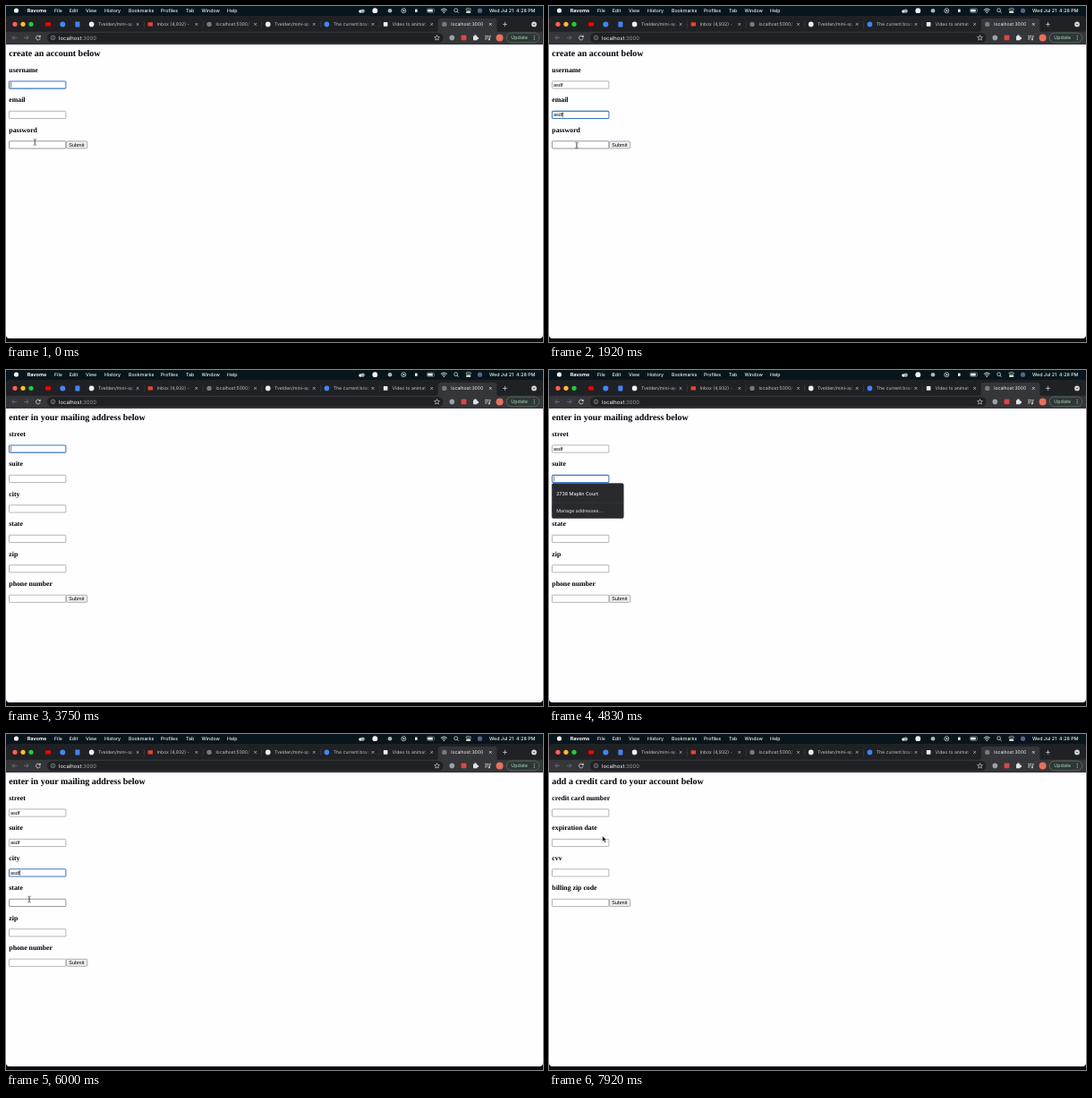
An HTML page for the animation above (8 s loop, 600 px wide and 375 px high).

```html
<!DOCTYPE html>
<html lang="en">
<head>
<meta charset="utf-8">
<title>Account form</title>
<style>
  html, body { margin: 0; width: 100%; height: 100%; overflow: hidden; background: #07090b; }
  svg { display: block; width: 100%; height: 100%; }
  text { white-space: pre; text-rendering: geometricPrecision; }
  .ui { font-family: Inter, "Open Sans", sans-serif; }
  .serif { font-family: "Liberation Serif", "Times New Roman", serif; font-weight: 700; }
  .form { font-family: "Liberation Sans", Arial, sans-serif; font-size: 5.55px; }
</style>
</head>
<body>
<svg viewBox="0 0 600 375" xmlns="http://www.w3.org/2000/svg">
  <defs>
    <linearGradient id="fade">
      <stop offset="0" stop-color="#202124" stop-opacity="0"/>
      <stop offset="1" stop-color="#202124"/>
    </linearGradient>
  </defs>
  <g id="frame"></g>
  <g id="page"></g>
</svg>
<script>
const LOOP = 8000;
const ROW = 33.45;

const text = (x, y, s, size, fill = '#fff', more = '') =>
  `<text x="${x}" y="${y}" font-size="${size}" fill="${fill}" ${more}>${s}</text>`;
const rect = (x, y, w, h, fill, r = 0, more = '') =>
  `<rect x="${x}" y="${y}" width="${w}" height="${h}" rx="${r}" fill="${fill}" ${more}/>`;
const dot = (x, y, r, fill, more = '') => `<circle cx="${x}" cy="${y}" r="${r}" fill="${fill}" ${more}/>`;
const line = (d, stroke, w = 0.7, more = '') =>
  `<path d="${d}" fill="none" stroke="${stroke}" stroke-width="${w}" ${more}/>`;

// ---- static browser window ----

function menuBar() {
  const items = [['File', 54], ['Edit', 70.7], ['View', 89], ['History', 110], ['Bookmarks', 137],
    ['Profiles', 173], ['Tab', 201], ['Window', 218.5], ['Help', 247]];
  const c = '#f0f2f3';
  return rect(0, 0, 600, 15, '#08151c')
    + dot(11.5, 5, 2.6, '#f2f2f2')
    + text(23.7, 7, 'Ravome', 5.5, '#fff', 'font-weight="700"')
    + items.map(([s, x]) => text(x, 7, s, 5.25, c, 'font-weight="500"')).join('')
    + dot(396, 6, 1.8, c) + dot(398.6, 5.6, 2.2, '#a9abad')
    + dot(412.3, 5.2, 2.9, '#f4f4f4')
    + dot(429, 5.2, 2.3, '#b5b7b9')
    + dot(444.3, 5.2, 2.5, 'none', `stroke="${c}" stroke-width=".7"`)
    + `<path d="M443.6 3.9 446 5.2 443.6 6.5Z" fill="${c}"/>`
    + rect(457, 3.6, 2.6, 3.2, c)
    + rect(470.4, 3, 8, 4.2, 'none', 1, 'stroke="#9fa1a3" stroke-width=".6"')
    + rect(471.2, 3.8, 5.6, 2.6, c, 0.4)
    + line('M485.8 4.4Q489.3 1.4 492.8 4.4M487.2 5.8Q489.3 4 491.4 5.8', c, 0.9)
    + dot(489.3, 7.2, 0.8, c)
    + dot(502.6, 4.7, 1.9, 'none', `stroke="${c}" stroke-width=".7"`) + line('M504 6.1 505.6 7.8', c)
    + rect(514, 2.7, 5.4, 2.1, 'none', 1, `stroke="${c}" stroke-width=".6"`)
    + rect(514, 5.7, 5.4, 2.1, c, 1)
    + dot(529.5, 5.2, 2.6, '#5b6484')
    + text(540, 7, 'Wed Jul 21  4:28 PM', 5.3, c, 'font-weight="500"');
}

function tabStrip() {
  const tabs = [
    ['Tvelden/mini-ap', 'hub'], ['Inbox (4,932) - ', 'mail'], ['localhost:5000/', 'globe'],
    ['Tvelden/mini-ap', 'hub'], ['The current bran', 'find'], ['Video to animat', 'clip'],
    ['localhost:3000', 'globe'],
  ];
  const icons = {
    hub: x => dot(x, 20.4, 2.8, '#f1f3f4'),
    mail: x => rect(x - 2.7, 18.2, 5.4, 4.4, '#ea4335', 0.5),
    globe: x => dot(x, 20.4, 2.7, '#777b80'),
    find: x => dot(x, 20.4, 2.8, '#4285f4'),
    clip: x => rect(x - 2.3, 18, 4.6, 4.8, '#eceded', 0.5),
  };
  let out = '<path d="M0 29V15Q0 11 4 11H596Q600 11 600 15V29Z" fill="#202124"/>'
    + dot(10, 20.3, 2.6, '#ff5f57') + dot(19, 20.3, 2.6, '#febc2e') + dot(28, 20.3, 2.6, '#28c840')
    + rect(44, 18.3, 6, 4.2, '#f00', 1)
    + dot(63.3, 20.4, 3, '#4285f4')
    + rect(77.4, 17.6, 5, 5.8, '#4285f4', 0.6)
    + '<path d="M480.5 29Q482.8 29 482.8 26.5V17Q482.8 14 485.8 14H545.4Q548.4 14 548.4 17V26.5Q548.4 29 550.7 29Z" fill="#35363a"/>';
  tabs.forEach(([title, icon], i) => {
    const x = 88.6 + i * 65.7, active = i === 6;
    out += icons[icon](x + 7) + text(x + 14.4, 22.3, title, 5.1, active ? '#f1f3f4' : '#c3c6ca');
    if (!active) out += rect(x + 56, 16, 9, 9, '#202124') + rect(x + 48, 16, 8.2, 9, 'url(#fade)');
    if (i < 5) out += line(`M${x + 65.7} 16.5V24.5`, '#4d4f53', 0.5);
    const c = x + 58.5;
    out += line(`M${c - 1.4} 19l2.8 2.8m0 -2.8l-2.8 2.8`, active ? '#fff' : '#d4d6da', 0.65);
  });
  return out
    + line('M555 20.4h5M557.5 17.9v5', '#dadce0', 0.7)
    + dot(590, 20.4, 2.9, '#d5d7da') + line('M588.8 19.9l1.2 1.2 1.2-1.2', '#202124', 0.7);
}

function toolbar() {
  const c = '#dfe1e5', dim = '#7b7e83';
  return rect(0, 28.7, 600, 14.3, '#35363a')
    + line('M12 35.4H7M9.3 33 6.9 35.4 9.3 37.8', dim)
    + line('M20 35.4h5M22.7 33 25.1 35.4 22.7 37.8', dim)
    + line('M37.8 34A2.4 2.4 0 1 0 38.2 36.2', c, 0.8) + `<path d="M38.6 32.6V35H36.2Z" fill="${c}"/>`
    + rect(46, 29.9, 442.5, 11.2, '#202124', 5.6)
    + dot(52.5, 35.4, 2.3, 'none', 'stroke="#b4b7bb" stroke-width=".6"')
    + line('M52.5 35v1.6M52.5 33.8v.6', '#b4b7bb', 0.6)
    + text(59, 37.5, 'localhost<tspan fill="#9aa0a6">:3000</tspan>', 5.95, '#f4f5f6')
    + line('M481.5 32.5l.8 2 2.1.1-1.6 1.4.5 2.1-1.8-1.1-1.8 1.1.5-2.1-1.6-1.4 2.1-.1Z', c, 0.6)
    + dot(498.3, 35.4, 2.8, '#9da1a6')
    + rect(508.6, 32.5, 5.8, 5.8, '#e0453c', 1)
    + rect(522, 33.6, 4.6, 4.6, c, 0.5) + dot(524.3, 33.4, 1.2, c) + dot(526.9, 35.9, 1.2, c)
    + line('M535 33.4h4.6M535 35.2h4.6M535 37h2.6M540.6 37.4v-4h1.3', c, 0.7) + dot(539.8, 37.4, 0.9, c)
    + dot(551.6, 35.4, 4, '#e8705c')
    + rect(559.2, 30, 36.6, 10.8, '#2f3735', 5.4, 'stroke="#6a8a7a" stroke-width=".6"')
    + text(564.3, 37.4, 'Update', 5.4, '#9cc4ac', 'font-weight="500"')
    + [33.4, 35.4, 37.4].map(y => dot(590.2, y, 0.55, '#9cc4ac')).join('');
}

document.getElementById('frame').innerHTML = '<g class="ui">' + menuBar() + tabStrip() + toolbar() + '</g>'
  + '<path d="M0 43H600V367Q600 371 596 371H4Q0 371 0 367Z" fill="#fefdff"/>';

// ---- timeline ----

const pages = [
  { at: 0, title: 'create an account below', labels: ['username', 'email', 'password'] },
  { at: 2920, title: 'enter in your mailing address below',
    labels: ['street', 'suite', 'city', 'state', 'zip', 'phone number'] },
  { at: 7420, title: 'add a credit card to your account below',
    labels: ['credit card number', 'expiration date', 'cvv', 'billing zip code'] },
];

// row, focus, blur, time of each key
const entries = [
  { page: 0, row: 0, on: 0, off: 1000, keys: [670, 750, 830, 830] },
  { page: 0, row: 1, on: 1000, off: 2000, keys: [1170, 1250, 1330, 1500] },
  { page: 0, row: 2, on: 2000, off: 2670, keys: [2080, 2170, 2250, 2330] },
  { page: 1, row: 0, on: 3750, off: 4830, keys: [3830, 3920, 4000, 4080] },
  { page: 1, row: 1, on: 4830, off: 5500, keys: [4920, 5000, 5080, 5170] },
  { page: 1, row: 2, on: 5500, off: 7170, keys: [5580, 5670, 5750, 5830], blink: [6500, 7080] },
];

// time, x, y; a lone time hides the pointer
const moves = [
  [0, 32.3, 152], [670],
  [1670, 32.3, 152], [1920, 31, 155.5], [2080],
  [2420, 31, 155.5], [2670, 73.5, 154], [2750, 73.5, 152], [2920, 73.5, 152],
  [3330, 61, 92.6], [3500, 61, 92.6], [3580, 38, 88], [3750],
  [4170, 30, 126.2], [4580, 30, 126.2], [4670, 33, 122.5], [4830],
  [5330, 30, 122], [5500, 25, 153], [5580],
  [5830, 25, 155], [6000, 26, 184.5], [6080, 26, 187], [6330, 106, 295], [6420, 106, 295],
  [6750, 81, 254], [6830, 80, 253], [7580, 80, 253], [7920, 59.7, 113.8], [LOOP, 59.7, 113.8],
];

const within = (t, a, b) => t >= a && t < b;
const rowY = i => 88 + ROW * i;

function pointer(t) {
  const i = moves.findLastIndex(m => m[0] <= t);
  const [t0, x, y] = moves[i];
  if (x === undefined) return null;
  const [t1, x1, y1] = moves[i + 1] || moves[i];
  if (x1 === undefined || t1 === t0) return { x, y };
  const k = (t - t0) / (t1 - t0);
  return { x: x + (x1 - x) * k, y: y + (y1 - y) * k };
}

function field(y, value, focus, caret, hover) {
  const ring = focus ? '#3a76c8' : hover ? '#6c6c6c' : '#999';
  let out = rect(3.5, y - 4.1, 63.4, 8.2, '#fff', focus ? 1.1 : 0.6,
    `stroke="${ring}" stroke-width="${focus ? 1.05 : 0.7}"`);
  if (value) out += text(5, y + 1.9, value, 5.55, '#000');
  if (caret) {
    const advance = { a: 0.556, s: 0.5, d: 0.556, f: 0.278 };
    const w = [...value].reduce((sum, ch) => sum + advance[ch] * 5.55, 0);
    out += rect(5 + w, y - 3, 0.5, 6, '#000');
  }
  return out;
}

const button = (y, hover) =>
  rect(67.4, y - 4, 23.4, 8, hover ? '#dedede' : '#efefef', 1.2,
    `stroke="${hover ? '#5c5c5c' : '#8c8c8c'}" stroke-width=".7"`)
  + text(70.2, y + 1.9, 'Submit', 5.55, '#000');

const suggestions = () => '<g class="ui">'
  + rect(3.3, 126.6, 80, 39, '#292a2d', 1.6, 'stroke="#1d1e20" stroke-width=".4"')
  + rect(3.5, 147.8, 79.6, 0.5, '#3c3d41')
  + text(8.3, 139.6, '2738 Maplin Court', 5.3, '#e8eaed', 'font-weight="500"')
  + text(8.3, 159.2, 'Manage addresses…', 5.25, '#e0e2e5') + '</g>';

function drawPointer({ x, y }, beam) {
  if (beam) return line(`M${x - 1.8} ${y - 3.4}q1.8 0 1.8 1v4.8q0 1 1.8 1M${x + 1.8} ${y - 3.4}q-1.8 0 -1.8 1v4.8q0 1 -1.8 1`, '#3a3a3a', 0.6);
  return `<path d="M${x} ${y}v6.4l1.5-1.4 1.1 2.5 1.2-.5-1.1-2.4h2Z" fill="#000" stroke="#fff" stroke-width=".5"/>`;
}

function draw(t) {
  const n = pages.findLastIndex(p => p.at <= t);
  const { title, labels } = pages[n];
  const p = pointer(t);
  const hoverRow = p && p.x > 3 && p.x < 67
    ? labels.findIndex((_, i) => Math.abs(p.y - rowY(i)) < 4.5) : -1;
  const lastY = rowY(labels.length - 1);
  const onButton = !!p && within(p.x, 67, 91) && Math.abs(p.y - lastY) < 4.5;

  let out = '<g class="serif">' + text(3.3, 55.9, title, 10, '#000')
    + labels.map((s, i) => text(3.3, 73.9 + ROW * i, s, 7.8, '#000')).join('') + '</g><g class="form">';
  labels.forEach((_, i) => {
    const e = entries.find(e => e.page === n && e.row === i);
    const value = e ? 'asdf'.slice(0, e.keys.filter(k => k <= t).length) : '';
    const focus = !!e && within(t, e.on, e.off);
    const caret = focus && !(e.blink && within(t, ...e.blink));
    out += field(rowY(i), value, focus, caret, hoverRow === i);
  });
  out += button(lastY, onButton) + '</g>';
  if (within(t, 4830, 4920)) out += suggestions();
  if (p) out += drawPointer(p, hoverRow >= 0);
  return out;
}

const view = document.getElementById('page');
const start = performance.now();
let shown = -1;

function tick() {
  const t = (performance.now() - start) % LOOP;
  const step = Math.floor((t + 5) * 12 / 1000) % 96;
  if (step !== shown) {
    shown = step;
    view.innerHTML = draw(Math.round(step * 25 / 3) * 10);
  }
  requestAnimationFrame(tick);
}
tick();
</script>
</body>
</html>
```
